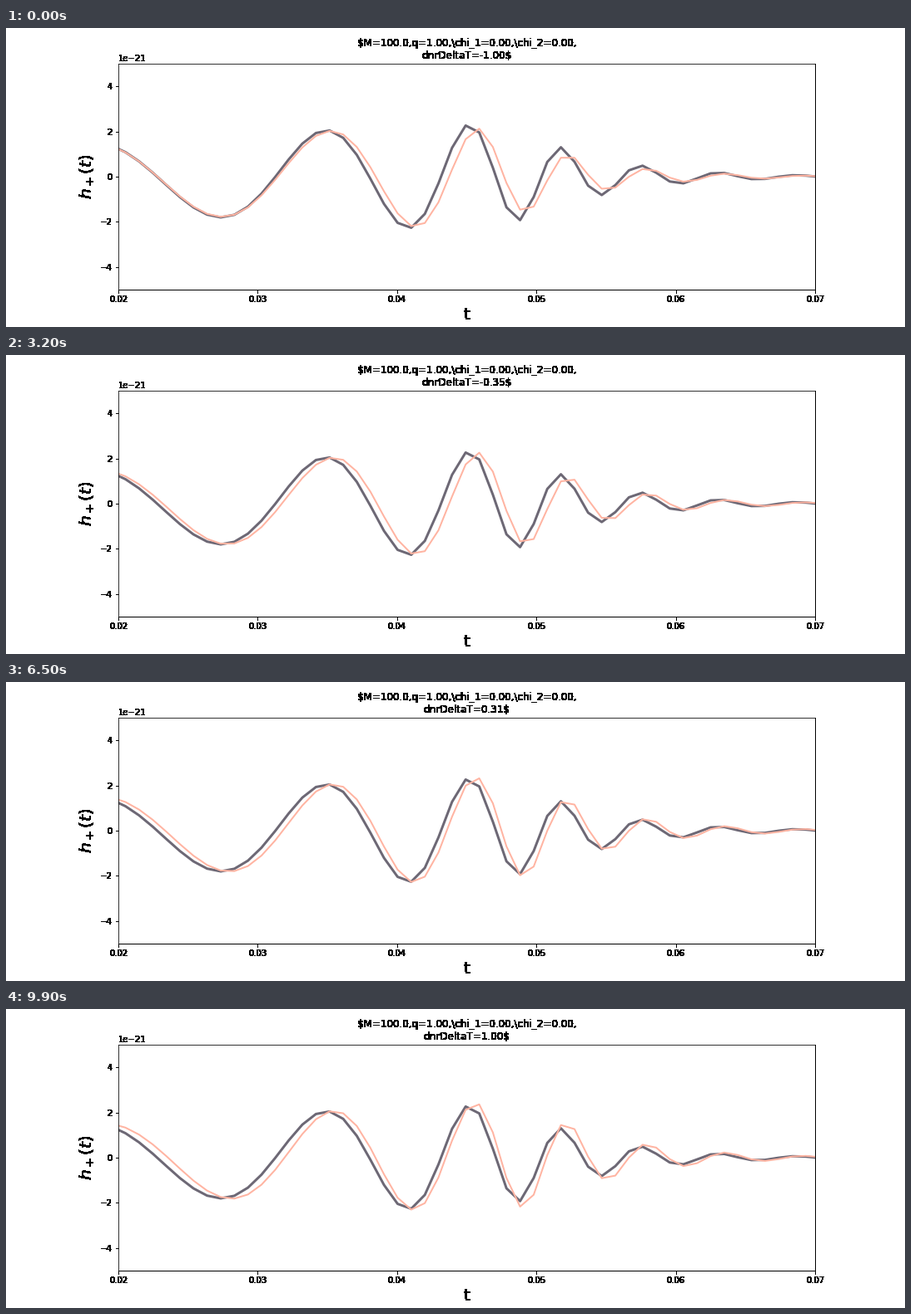
Animation, 1080 px wide and 360 px high, one loop 10 s. Source, as a matplotlib script:

```python
import numpy as np
import matplotlib
import matplotlib.pyplot as plt
from matplotlib.animation import FuncAnimation

FRAMES, INTERVAL = 100, 100
RATE = 1024              # samples per second
UNIT = 1e-21
STEP_PX = 16.35          # one sample on screen
SLATE, CORAL = "#6D6875", "#FFB4A2"

matplotlib.rcParams.update({"font.family": "DejaVu Sans", "font.size": 10})


def ramp(x, width):
    """Zero far below x = 0, then bends smoothly into the line y = x."""
    return width * np.log1p(np.exp(x / width))


def step(x, width):
    return 1 / (1 + np.exp(-x / width))


# Chirp: half cycles per sample rise and settle at the ringdown rate
GRID = np.arange(15, 76, .01)
CHIRP = .35 / np.sqrt(1 + .438 * ramp(46.67 - GRID, 2.9))
PHASE = np.pi * .01 * np.cumsum(CHIRP)
PHASE -= np.interp(48.21, GRID, PHASE)


def strain(s):
    """Strain at sample s: slow growth up to the merger, then decay."""
    amp = np.exp(.588 + .0175 * (s - 28) - .188 * ramp(s - 49.2, 1.8))
    return -amp * np.sin(np.interp(s, GRID, PHASE)) * UNIT


# How strongly each sample feels the phase stretch and the amplitude change
K = np.arange(20, 73)
WARP = 1.03 * step(36 - K, 3.5) + .32 * step(K - 53, 2)
GAIN = .05 + 1.15 * step(K - 49.3, 2)


def merger_delay(i, p):
    """Steady drift of the merger in pixels, snapped back by whole samples."""
    drift = -16.5 - 27.3 * p - .9 * np.sin(np.pi * p)
    return drift + STEP_PX * max(0, np.floor((i - 2.5) / 27.5))


def shifted_strain(i, p):
    delay = merger_delay(i, p) + (9.1 * p - 1.3 * p * p) * WARP
    gain = np.exp((.22 * p - .05 * p * p) * GAIN)
    return gain * strain(K - delay / STEP_PX)


def solid(img, dpi):
    """Turn every touched pixel fully black, for hard-edged lettering."""
    out = np.zeros_like(img)
    out[..., 3] = img[..., 3] > 0
    return out, 0, 0


fig, ax = plt.subplots(figsize=(15, 5), dpi=72, facecolor="white")
fig.subplots_adjust(left=.125, right=.9, bottom=.125, top=.88)
ax.plot(K / RATE, strain(K), color=SLATE, lw=3)
wave, = ax.plot([], [], color=CORAL, lw=2)
ax.set_xticks(np.arange(2, 8) / 100)
ax.set_yticks(np.arange(-4, 5, 2) * UNIT)
ax.set_xlim(.02, .07)
ax.set_ylim(-5 * UNIT, 5 * UNIT)
ax.set_xlabel("t", fontsize=20)
ax.set_ylabel("$h_+(t)$", fontsize=20)
title = ax.set_title("", fontsize=12, parse_math=False)

for artist in (title, ax.xaxis, ax.yaxis,
               ax.spines["right"], ax.spines["bottom"]):
    artist.set_agg_filter(solid)


def update(i):
    p = -1 + 2 * i / (FRAMES - 1)
    wave.set_data(K / RATE, shifted_strain(i, p))
    title.set_text("$M=100.0,q=1.00,\\chi_1=0.00,\\chi_2=0.00,\n"
                   f"dnrDeltaT={p:.2f}$")
    return wave, title


anim = FuncAnimation(fig, update, frames=FRAMES, interval=INTERVAL,
                     init_func=lambda: update(0), repeat=True)
plt.show()
```
